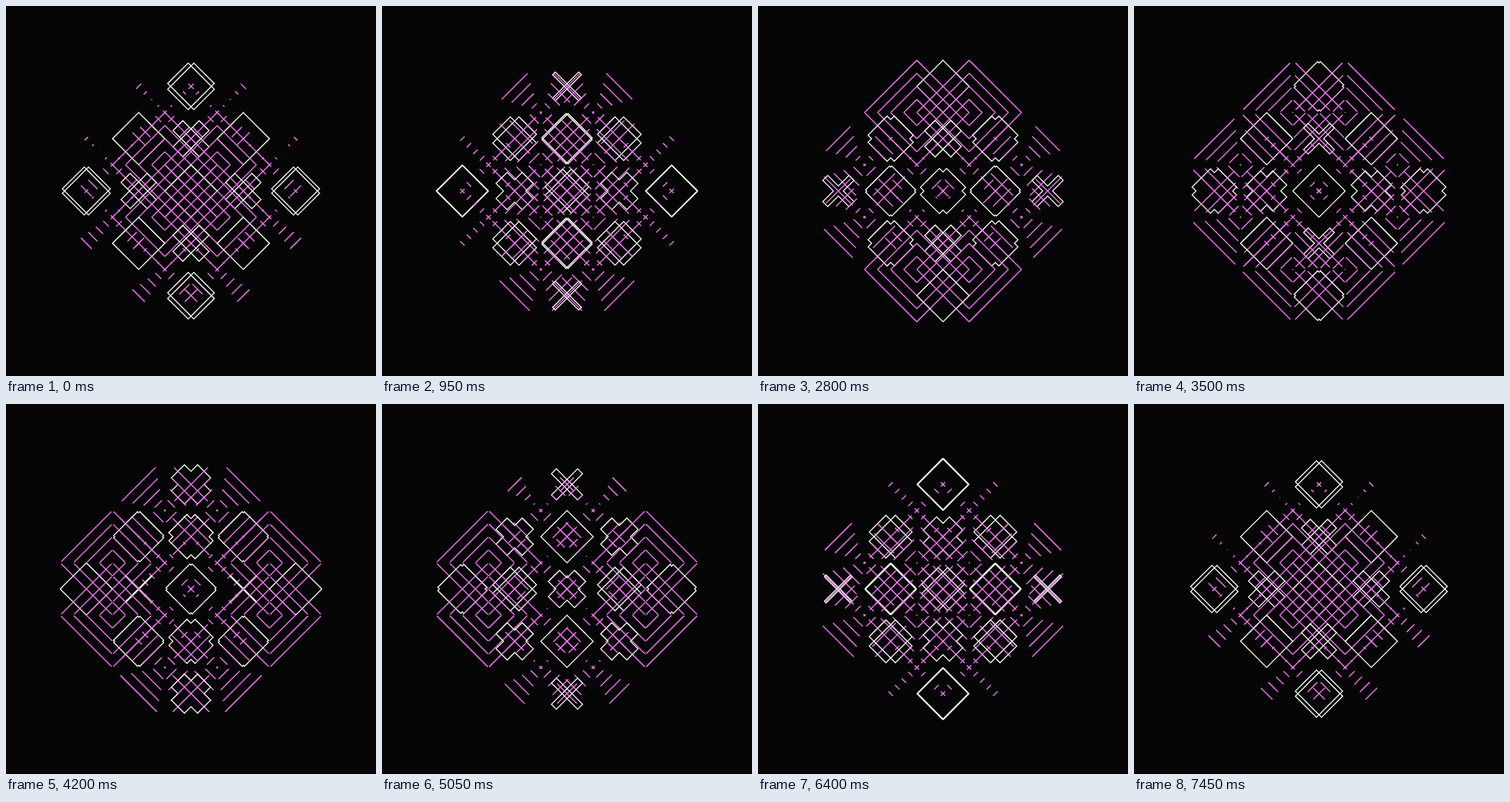
An HTML page with a canvas that plays this animation: 540x540 px, repeating every 7.5 s.

```html
<!DOCTYPE html>
<html lang="en">
<head>
<meta charset="utf-8">
<title>Parquet of crosses and squares</title>
<style>
  html, body { margin: 0; width: 100%; height: 100%; overflow: hidden; background: #050505; }
  canvas { display: block; width: 540px; height: 540px; }
</style>
</head>
<body>
<canvas id="stage" width="540" height="540"></canvas>
<script>
const LOOP = 7500, STEP = 50;
const CELL = 54, HALF = CELL / 2;
const TICK = 4.5;   // half-length of a line in the resting pattern
const RINGS = 4;

// Phase in degrees, keyed by the product of the cell's column and row.
const CROSS_PHASE = { "-4": -33.5, "-1": 69.5, "0": 2.4, "1": -68, "4": 38.5 };
const LINES_PHASE = { "-2": -43.5, "0": 182.4, "2": 48.5 };

const ctx = document.getElementById("stage").getContext("2d");

// Eased 0..1..0 over one loop.
function wave(time, phase) {
  return (1 - Math.cos(2 * Math.PI * (time / LOOP + phase / 360))) / 2;
}

// Twelve-cornered cross; a negative arm width folds it into two rectangles.
function drawCross(s) {
  const a = HALF, b = HALF * (2 * s - 1);
  const quarter = [[a, b], [b, b], [b, a]];
  ctx.beginPath();
  for (let q = 0; q < 4; q++) {
    const points = q % 2 ? [...quarter].reverse() : quarter;
    const sx = q === 1 || q === 2 ? -1 : 1;
    const sy = q > 1 ? -1 : 1;
    for (const [x, y] of points) ctx.lineTo(sx * x, sy * y);
  }
  ctx.closePath();
  ctx.strokeStyle = "#eef5ea";
  ctx.stroke();
}

// Two sets of parallel lines that grow from ticks into nested squares.
function drawLines(s) {
  ctx.beginPath();
  for (let k = -RINGS; k <= RINGS; k++) {
    const d = CELL * k / RINGS;
    const len = TICK * (1 - s) + d * s;
    ctx.moveTo(d, -len);
    ctx.lineTo(d, len);
    ctx.moveTo(-len, d);
    ctx.lineTo(len, d);
  }
  ctx.strokeStyle = "#ff74ff";
  ctx.stroke();
}

function draw(time) {
  ctx.setTransform(1, 0, 0, 1, 0, 0);
  ctx.fillStyle = "#050505";
  ctx.fillRect(0, 0, 540, 540);
  ctx.translate(270, 270);
  ctx.rotate(Math.PI / 4);
  ctx.lineWidth = 1.5;
  for (let row = -2; row <= 2; row++) {
    for (let col = -2; col <= 2; col++) {
      const key = row * col + 0;
      ctx.save();
      ctx.translate(row * CELL, col * CELL);
      if ((row + col) % 2 === 0) drawCross(wave(time, CROSS_PHASE[key]));
      else drawLines(wave(time, LINES_PHASE[key]));
      ctx.restore();
    }
  }
}

const start = performance.now();
function tick() {
  const time = (performance.now() - start) % LOOP;
  draw(Math.floor(time / STEP) * STEP);
  requestAnimationFrame(tick);
}
tick();
</script>
</body>
</html>
```
